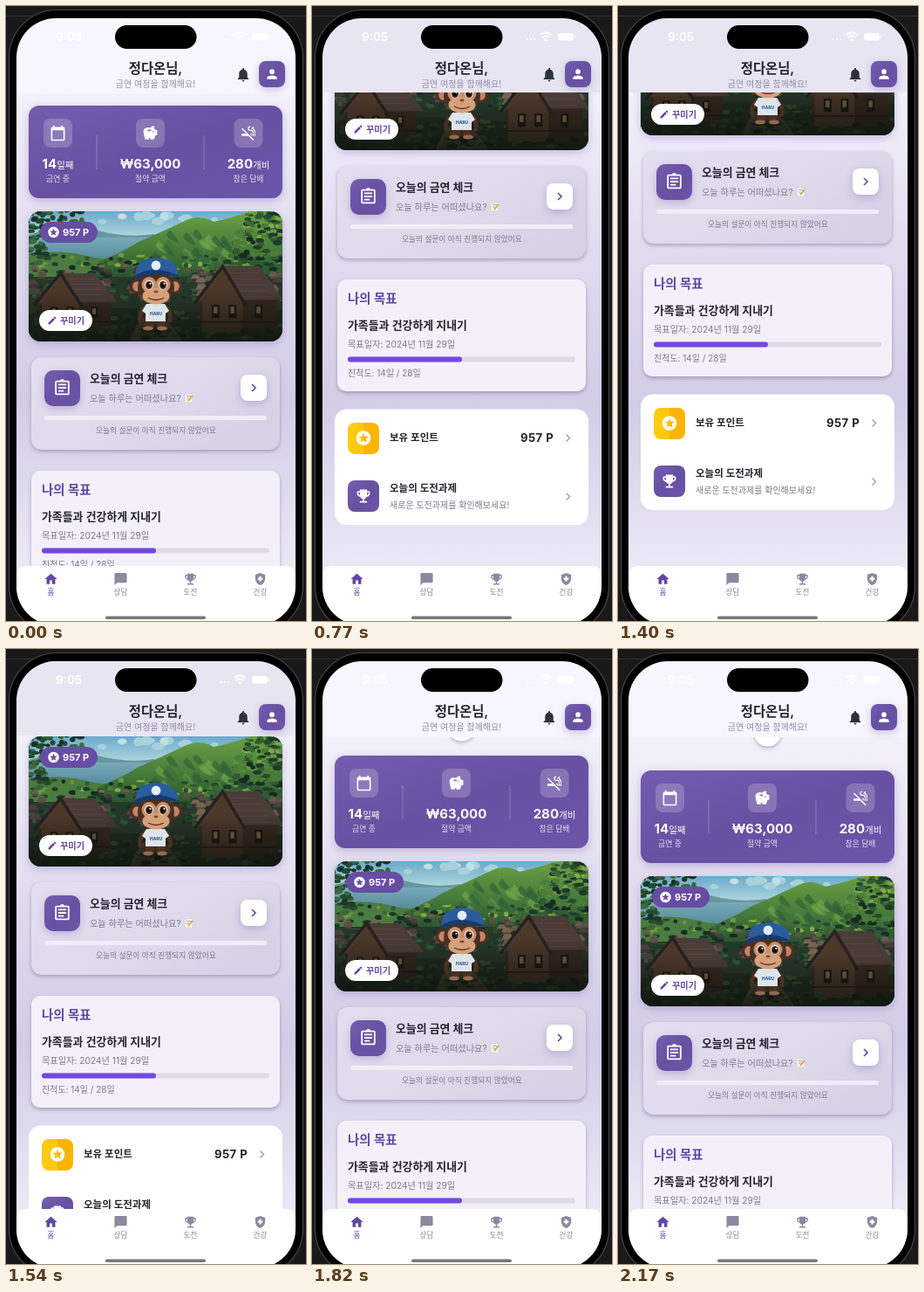
Animation of 344 by 704 pixels, one loop 2.24 s. Source, as an HTML page:

```html
<!DOCTYPE html>
<html lang="ko">
<head>
<meta charset="utf-8">
<title>금연 홈</title>
<style>
  html, body { margin: 0; width: 100%; height: 100%; overflow: hidden; background: #191919; }
  svg { display: block; width: 100%; height: 100%; }
  text { font-family: Inter, "Noto Sans CJK KR", "Noto Sans CJK JP", "Noto Sans CJK", sans-serif; white-space: pre; }
  .soft { filter: drop-shadow(0 2px 2px rgba(60, 50, 90, .34)); }
  .glow { filter: drop-shadow(0 3px 5px rgba(100, 75, 165, .3)); }
</style>
</head>
<body>
<svg id="stage" viewBox="0 0 344 704"></svg>
<script>
const ICONS = {
  home: 'M10 20v-6h4v6h5v-8h3L12 3 2 12h3v8z',
  chat: 'M20 2H4c-1.1 0-2 .9-2 2v18l4-4h14c1.1 0 2-.9 2-2V4c0-1.1-.9-2-2-2z',
  trophy: 'M19 5h-2V3H7v2H5c-1.1 0-2 .9-2 2v1c0 2.55 1.92 4.63 4.39 4.94.63 1.5 1.98 2.63 3.61 2.96V19H7v2h10v-2h-4v-3.1c1.63-.33 2.98-1.46 3.61-2.96C19.08 12.63 21 10.55 21 8V7c0-1.1-.9-2-2-2zM5 8V7h2v3.82C5.84 10.4 5 9.3 5 8zm14 0c0 1.3-.84 2.4-2 2.82V7h2v1z',
  shield: 'M10.5 13H8v-3h2.5V7.5h3V10H16v3h-2.5v2.5h-3V13zM12 2L4 5v6.09c0 5.05 3.41 9.76 8 10.91 4.59-1.15 8-5.86 8-10.91V5l-8-3z',
  person: 'M12 12a4 4 0 1 0 0-8 4 4 0 0 0 0 8zm0 2c-2.67 0-8 1.34-8 4v2h16v-2c0-2.66-5.33-4-8-4z',
  bell: 'M12 22c1.1 0 2-.9 2-2h-4c0 1.1.89 2 2 2zm6-6v-5c0-3.07-1.64-5.64-4.5-6.32V4a1.5 1.5 0 0 0-3 0v.68C7.63 5.36 6 7.92 6 11v5l-2 2v1h16v-1l-2-2z',
  pencil: 'M3 17.25V21h3.75L17.81 9.94l-3.75-3.75L3 17.25zM20.71 7.04a1 1 0 0 0 0-1.41l-2.34-2.34a1 1 0 0 0-1.41 0l-1.83 1.83 3.75 3.75z',
  calendar: 'M20 3h-1V1h-2v2H7V1H5v2H4c-1.1 0-2 .9-2 2v16c0 1.1.9 2 2 2h16c1.1 0 2-.9 2-2V5c0-1.1-.9-2-2-2zm0 18H4V8h16v13z',
  piggy: 'M19.83 7.5l-2.27-2.27c.07-.42.18-.81.32-1.15A1.5 1.5 0 0 0 16.5 2c-1.64 0-3.09.79-4 2h-5C4.46 4 2 6.46 2 9.5S4.5 21 4.5 21H10v-2h2v2h5.5l1.68-5.59 2.82-.94V7.5zM13 9H8V7h5zm3 2a1 1 0 1 1 0-2 1 1 0 0 1 0 2z',
  noSmoke: 'M2 6l7 7H2v3h10l7 7 1.25-1.25-17-17zM20.5 13H22v3h-1.5zM18 13h1.5v3H18zM18.85 4.9a3.3 3.3 0 0 0 1-2.4h-1.5c0 1-.8 1.85-1.85 1.85v1.5c2.24 0 4 1.8 4 4V12H22V9.9c0-2.2-1.3-4.1-3.15-5zM14.5 8.7H16c1 0 2 .7 2 2V12h1.5v-1.6c0-1.8-1.6-3.1-3.5-3.1h-1.5a1.9 1.9 0 0 1 0-3.8V2a3.35 3.35 0 0 0 0 6.7zM17 16v-3h-3z',
  clipboard: 'M7 15h7v2H7zm0-4h10v2H7zm0-4h10v2H7zm12-4h-4.18a3 3 0 0 0-5.64 0H5c-1.1 0-2 .9-2 2v14c0 1.1.9 2 2 2h14c1.1 0 2-.9 2-2V5c0-1.1-.9-2-2-2zm0 16H5V5h14z',
  star: 'M12 2a10 10 0 1 0 0 20 10 10 0 0 0 0-20zm4.24 16L12 15.45 7.77 18l1.12-4.81-3.73-3.23 4.92-.42L12 5l1.92 4.53 4.92.42-3.73 3.23z'
};
const INK = '#25232f', GREY = '#7d788c', PURPLE = '#6147a3';

const box = (x, y, w, h, r, fill, more = '') =>
  `<rect x="${x}" y="${y}" width="${w}" height="${h}" rx="${r}" fill="${fill}" ${more}/>`;
const shape = (d, fill, more = '') => `<path d="${d}" fill="${fill}" ${more}/>`;
const line = (d, color, width, more = '') =>
  `<path d="${d}" fill="none" stroke="${color}" stroke-width="${width}" ${more}/>`;
const oval = (x, y, rx, ry, fill, more = '') =>
  `<ellipse cx="${x}" cy="${y}" rx="${rx}" ry="${ry}" fill="${fill}" ${more}/>`;
const text = (s, x, y, size, fill, weight = 400, more = '') =>
  `<text x="${x}" y="${y}" font-size="${size}" fill="${fill}" font-weight="${weight}" ${more}>${s}</text>`;
const mid = (s, x, y, size, fill, weight) => text(s, x, y, size, fill, weight, 'text-anchor="middle"');
const icon = (name, cx, cy, size, fill) =>
  `<path d="${ICONS[name]}" fill="${fill}" fill-rule="evenodd" transform="translate(${cx - size / 2} ${cy - size / 2}) scale(${size / 24})"/>`;
const chevron = (x, y, color) => line(`M${x - 2} ${y - 4}l4 4-4 4`, color, 1.6);
const gradient = (id, stops, dir = 'x2="0" y2="1"') =>
  `<linearGradient id="${id}" ${dir}>${stops.map(([o, c]) => `<stop offset="${o}" stop-color="${c}"/>`).join('')}</linearGradient>`;

let seed = 7;
const rnd = () => (seed = seed * 16807 % 2147483647) / 2147483647;
const pick = list => list[Math.floor(rnd() * list.length)];
const scatter = (n, draw) => Array.from({ length: n }, (_, i) => draw(i / n)).join('');
const leaves = (n, x, y, w, h, r, colors) =>
  scatter(n, () => oval((x + rnd() * w).toFixed(1), (y + rnd() * h).toFixed(1), (r * (.6 + rnd())).toFixed(1), (r * (.4 + rnd() * .5)).toFixed(1), pick(colors)));

const hut = (x, y, s) =>
  box(x - s * .7, y, s * 1.4, s * .7, 0, pick(['#38352f', '#574c3f', '#2f2e2b'])) +
  shape(`M${x - s} ${y + 1}L${x - s * .5} ${y - s * .7}H${x + s * .5}L${x + s} ${y + 1}z`, pick(['#5b5047', '#6b5b4d', '#463f3b', '#766352']));

// timber house: wall, long roof and a front gable
const house = (x, y, w, h) => {
  const gx = x + w * .3;
  return box(x, y + h * .45, w, h * .55, 0, '#37291f') +
    shape(`M${x - 5} ${y + h * .52}L${gx} ${y}H${x + w * .78}L${x + w + 8} ${y + h * .5}z`, '#4a3c36') +
    scatter(5, t => line(`M${x + w * .06 + 2} ${y + h * (.1 + t * .45)}H${x + w * (.78 + t * .2)}`, '#5f4b41', .7)) +
    shape(`M${gx} ${y + h * .05}L${x + w * .56} ${y + h * .55}V${y + h}H${x + 3}V${y + h * .5}z`, '#4c3829') +
    line(`M${x - 6} ${y + h * .56}L${gx} ${y}L${x + w * .6} ${y + h * .58}`, '#262120', 3.5) +
    [.16, .38, .72].map(t => box(x + w * t, y + h * .58, w * .1, h * .2, 0, '#191816') + box(x + w * t + 2, y + h * .61, w * .05, h * .1, 0, '#80643c')).join('') +
    box(x, y + h * .83, w, 1.5, 0, '#241a14');
};

function village() {
  const dark = ['#1d3a29', '#284b2d', '#325a32', '#162c22'], lit = ['#4c7c36', '#6a9a40', '#376a34', '#82ab48'];
  return box(26, 235, 291, 149, 0, 'url(#sky)') +
    leaves(14, 110, 236, 140, 12, 6, ['#c3dfe2', '#a9d1dc']) +
    shape('M26 262Q70 248 105 257T170 261V278H26z', '#66979f') +
    shape('M26 265H170V310H26z', 'url(#water)') +
    shape('M26 284Q60 278 92 286T150 284V312H26z', '#4a7c41') +
    shape('M98 296Q130 284 152 270Q180 258 207 245Q222 238 238 247Q262 242 280 235H317V320H98z', 'url(#hill)') +
    scatter(30, () => {
      const x = 158 + rnd() * 120, y = 254 + rnd() * 32;
      return shape(`M${x} ${y}q6 5 11 15q-11-2-15-10z`, pick(['#2a5a35', '#6f9f46', '#7eac4e', '#3a723a']), 'opacity=".55"');
    }) +
    leaves(110, 30, 284, 285, 18, 3.5, dark.concat(lit)) +
    leaves(60, 275, 236, 42, 30, 3.5, dark.concat(lit)) +
    leaves(50, 262, 262, 55, 40, 4, dark.concat('#4c7c36')) +
    leaves(40, 22, 232, 66, 16, 3.5, ['#234a31', '#3c6b38', '#183526']) +
    leaves(26, 22, 244, 22, 40, 4, ['#234a31', '#3c6b38', '#183526']) +
    box(26, 310, 291, 74, 0, '#28372a') +
    leaves(70, 26, 302, 291, 36, 3.5, dark) +
    scatter(70, t => hut(28 + rnd() * 286, 298 + t * 36, 4 + t * 5) + leaves(2, 28 + rnd() * 286, 300 + t * 36, 8, 6, 3, dark)) +
    shape('M26 384V352Q100 342 170 348T317 348V384z', '#202e20') +
    leaves(80, 26, 348, 291, 34, 3.5, ['#16251b', '#253c24', '#34502c', '#1b2c1e']) +
    shape('M142 384Q150 358 168 350Q188 358 202 384z', '#4f4834') +
    house(38, 306, 82, 66) + house(222, 298, 88, 76) +
    leaves(40, 26, 366, 291, 16, 3.5, ['#16251b', '#253c24', '#2d4728']) +
    box(26, 324, 291, 60, 0, 'url(#dusk)');
}

function monkey() {
  const fur = '#4b2f23', skin = '#c8906c';
  const side = (x, dir) =>
    oval(x, 321, 7.5, 8.5, fur) + oval(x + dir, 321, 4.8, 5.8, '#c48468') +
    line(`M${171 - dir * 11} 344q${-dir * 8} 7 ${-dir * 6} 16`, fur, 5, 'stroke-linecap="round"');
  const eye = x => oval(x, 319, 5, 5.6, '#efe9e2') + oval(x, 319.5, 3.9, 4.6, '#4a2817') + oval(x, 319.5, 2.5, 3, '#120d0b') + oval(x + 1.4, 317.8, 1, 1.1, '#fff');
  return oval(171, 371, 20, 3, '#10160f', 'opacity=".6"') +
    side(149, 1) + side(195, -1) +
    box(160, 356, 9.5, 14, 4, fur) + box(173, 356, 9.5, 14, 4, fur) +
    oval(163, 369, 6, 2.5, '#96694e') + oval(179, 369, 6, 2.5, '#96694e') +
    shape('M161 341H182L187 349 183 352V361H160V352L156 349z', '#dfe4e8') +
    mid('HARU', 172, 354, 5, '#2d5f9e', 800) +
    oval(172, 322, 21, 19, fur) + oval(164, 319, 8.5, 9, skin) + oval(180, 319, 8.5, 9, skin) +
    oval(172, 332, 15.5, 9.5, '#d5a17b') + eye(164) + eye(180) +
    oval(172, 327, 2.6, 1.4, '#7a4c3a') +
    line('M163 334q9 5 18 0', '#6b3028', 1.4) +
    shape('M149 309Q147 289 173 288Q198 290 197 309Q174 300 149 309z', '#2a5c9e') +
    shape('M146 309Q170 295 199 309Q187 310 174 307Q158 308 148 312z', '#173a6d') +
    oval(172, 297, 5.4, 5.4, '#e6eef6');
}

const stat = (cx, name, number, unit, label) =>
  box(cx - 16.5, 129, 33, 33, 8, '#fff', 'opacity=".2"') + icon(name, cx, 145.5, 19, '#fff') +
  mid(`${number}<tspan font-size="10.5" font-weight="500">${unit}</tspan>`, cx, 185.5, 15, '#fff', 700) +
  mid(label, cx, 201, 8.8, '#e3def1');

const stats = `<g class="glow">${box(26, 114, 291, 106, 12, 'url(#purple)')}</g>` +
  stat(59.5, 'calendar', '14', '일째', '금연 중') +
  stat(165.5, 'piggy', '₩63,000', '', '절약 금액') +
  stat(278, 'noSmoke', '280', '개비', '참은 담배') +
  box(103.5, 148, 1, 39, 0, '#fff', 'opacity=".25"') + box(226.5, 148, 1, 39, 0, '#fff', 'opacity=".25"');

const scene = `<g class="glow">${box(26, 235, 291, 149, 14, '#28372a')}</g>` +
  `<g clip-path="url(#photo)">${village()}${monkey()}</g>` +
  box(39, 247, 66, 24, 12, '#674da3') + icon('star', 54.5, 259, 15, '#fff') + text('957 P', 65, 263, 11, '#fff', 700) +
  box(38, 348, 61, 24, 12, '#fff') + icon('pencil', 53, 360, 12, PURPLE) + text('꾸미기', 62, 364, 10.2, PURPLE, 600);

const check = `<g class="soft">${box(29, 402, 285, 106, 12, 'url(#lilac)')}</g>` +
  `<g class="glow">${box(44, 417, 41, 41, 10, 'url(#purple)')}${box(269, 422, 30, 30, 8, '#fff')}</g>` +
  icon('clipboard', 64.5, 437, 22, '#fff') + chevron(284, 437, PURPLE) +
  text('오늘의 금연 체크', 96, 431, 12.9, INK, 700) +
  text('오늘 하루는 어떠셨나요?', 96, 452.5, 10.2, GREY) +
  box(205, 444, 9, 10, 1, '#f7f5ee', 'stroke="#c6c2c4" stroke-width=".5"') +
  line('M207 446.5h5M207 449h3', '#9895a4', .8) + line('M209 452l5-6', '#d8a035', 1.7) +
  box(44, 469, 255, 5, 2.5, '#f0edf7') +
  mid('오늘의 설문이 아직 진행되지 않았어요', 171.8, 489, 8.7, GREY);

const goal = `<g class="soft">${box(29, 532, 285, 128, 10, '#f3f0fa')}</g>` +
  text('나의 목표', 41, 558.5, 14.4, PURPLE, 700) +
  text('가족들과 건강하게 지내기', 41, 588.5, 12.9, INK, 600) +
  text('목표일자: 2024년 11월 29일', 41, 610, 10.2, GREY) +
  box(41, 620.5, 261, 6, 3, '#dedbe4') + box(41, 620.5, 131, 6, 3, '#7447e4') +
  text('진척도: 14일 / 28일', 41, 643, 10, GREY);

const links = box(26, 680.5, 291, 132.5, 14, '#fff') +
  box(41, 696, 36, 36, 8, 'url(#gold)') + icon('star', 59, 713.5, 20, '#fff') +
  text('보유 포인트', 89, 717, 11.5, INK, 600) +
  text('957 P', 239, 718, 13.2, INK, 700, 'letter-spacing=".4"') + chevron(293.5, 713.5, '#aaa6b6') +
  box(41, 762, 36, 36, 8, 'url(#purple)') + icon('trophy', 59, 780, 20, '#fff') +
  text('오늘의 도전과제', 89, 774.5, 11.5, INK, 600) +
  text('새로운 도전과제를 확인해보세요!', 89, 794, 10, GREY) + chevron(293.5, 780.5, '#aaa6b6');

const header = '<rect id="bar" x="12" y="14" width="320"/>' +
  text('9:05', 57, 39.5, 13.5, '#fff', 600) +
  [247, 251, 255].map(x => oval(x, 38, 1, 1, '#fff')).join('') +
  line('M261.5 33q6.5-5.5 13 0M264 36q4-3.5 8 0', '#fff', 1.8) + oval(268, 38.6, 1.7, 1.6, '#fff') +
  box(282, 31, 18, 8.5, 3, '#fff') + box(301, 33.5, 1.2, 3.5, .6, '#fff') +
  mid('정다온님,', 171.5, 76.5, 15.4, INK, 600) +
  mid('금연 여정을 함께해요!', 171.5, 92.5, 10, '#918da5') +
  icon('bell', 272, 78.5, 19, '#2b323c') +
  `<g class="glow">${box(290, 63, 30, 30, 8, 'url(#purple)')}</g>` + icon('person', 305, 78, 17, '#fff');

const tab = (x, name, label, color) => icon(name, x, 656, 17, color) + mid(label, x, 674, 8.6, color, 500);
const nav = shape('M12 709V653Q12 641 24 641H320Q332 641 332 653V709z', '#fff') +
  tab(51.5, 'home', '홈', PURPLE) + tab(131.5, 'chat', '상담', '#8b89a0') +
  tab(211.5, 'trophy', '도전', '#8b89a0') + tab(291.5, 'shield', '건강', '#8b89a0') +
  box(114, 698.5, 115, 3.5, 1.75, '#77777b');

document.getElementById('stage').innerHTML = `<defs>
  ${gradient('purple', [[0, '#745cae'], [.5, '#6850a2'], [1, '#6b55a8']], 'x2="1" y2="1"')}
  ${gradient('lilac', [[0, '#e3dff0'], [.6, '#dfdaeb'], [1, '#d7d1e6']], 'x2="1" y2=".6"')}
  ${gradient('gold', [[0, '#fdcc12'], [.49, '#fdc70c'], [.51, '#fbb404'], [1, '#fbb404']], 'x2="1" y2="0"')}
  ${gradient('page', [[0, '#f3f1fb'], [.3, '#e2ddf0'], [.65, '#d2cce6'], [.8, '#dcd8ed'], [1, '#ebe8f6']])}
  ${gradient('sky', [[0, '#6aa9cc'], [.2, '#b2d8dd']])}
  ${gradient('water', [[0, '#78aab8'], [1, '#3b7483']])}
  ${gradient('hill', [[0, '#6b9f45'], [.45, '#4a803b'], [1, '#24492d']])}
  <linearGradient id="dusk" x2="0" y2="1"><stop stop-color="#0c0f0b" stop-opacity="0"/><stop offset="1" stop-color="#0c0f0b" stop-opacity=".7"/></linearGradient>
  <clipPath id="photo">${box(26, 235, 291, 149, 14, '#000')}</clipPath>
  <clipPath id="screen">${box(12, 14, 320, 695, 45, '#000')}</clipPath>
</defs>
${box(0, 0, 344, 704, 0, '#191919')}
${box(0, 11, 344, 1, 0, '#303030')}
${box(3.5, 4.5, 337, 714, 55, '#000', 'stroke="#45454a" stroke-width="1.2"')}
<g clip-path="url(#screen)">
  ${box(12, 99, 320, 543, 0, 'url(#page)')}
  ${box(12, 641, 320, 68, 0, '#ebe8f6')}
  <g id="content">${stats}${scene}${check}${goal}${links}</g>
  <g id="refresh" class="soft">${oval(171.5, 0, 15.5, 15.5, '#fff')}</g>
  ${header}${nav}
</g>
${box(125, 22, 93.5, 27, 13.5, '#000')}`;

// [start in ms, scroll offset in px]; negative offsets are overscroll
const SCROLL = [
  [0, 0], [560, 54], [630, 126], [700, 182], [770, 219], [840, 240], [910, 250], [1050, 255], [1120, 256],
  [1260, 253], [1330, 247], [1400, 236], [1470, 187], [1540, 135], [1610, 88], [1680, 49.5], [1750, 18],
  [1820, -8], [1890, -24], [1960, -29], [2030, -29.5], [2100, -28], [2170, -25]
];
const LOOP = 2240;
const content = document.getElementById('content');
const refresh = document.getElementById('refresh');
const bar = document.getElementById('bar');

function draw() {
  const time = performance.now() % LOOP;
  const offset = SCROLL.filter(([start]) => start <= time).pop()[1];
  const scrolled = offset > 0;
  content.setAttribute('transform', `translate(0 ${-offset})`);
  refresh.setAttribute('transform', `translate(0 ${Math.min(87 - offset * .36, 98)})`);
  refresh.style.display = offset < 0 ? '' : 'none';
  bar.setAttribute('height', scrolled ? 85 : 87);
  bar.setAttribute('fill', scrolled ? '#e8e5f2' : '#f7f5fd');
  requestAnimationFrame(draw);
}
draw();
</script>
</body>
</html>
```
